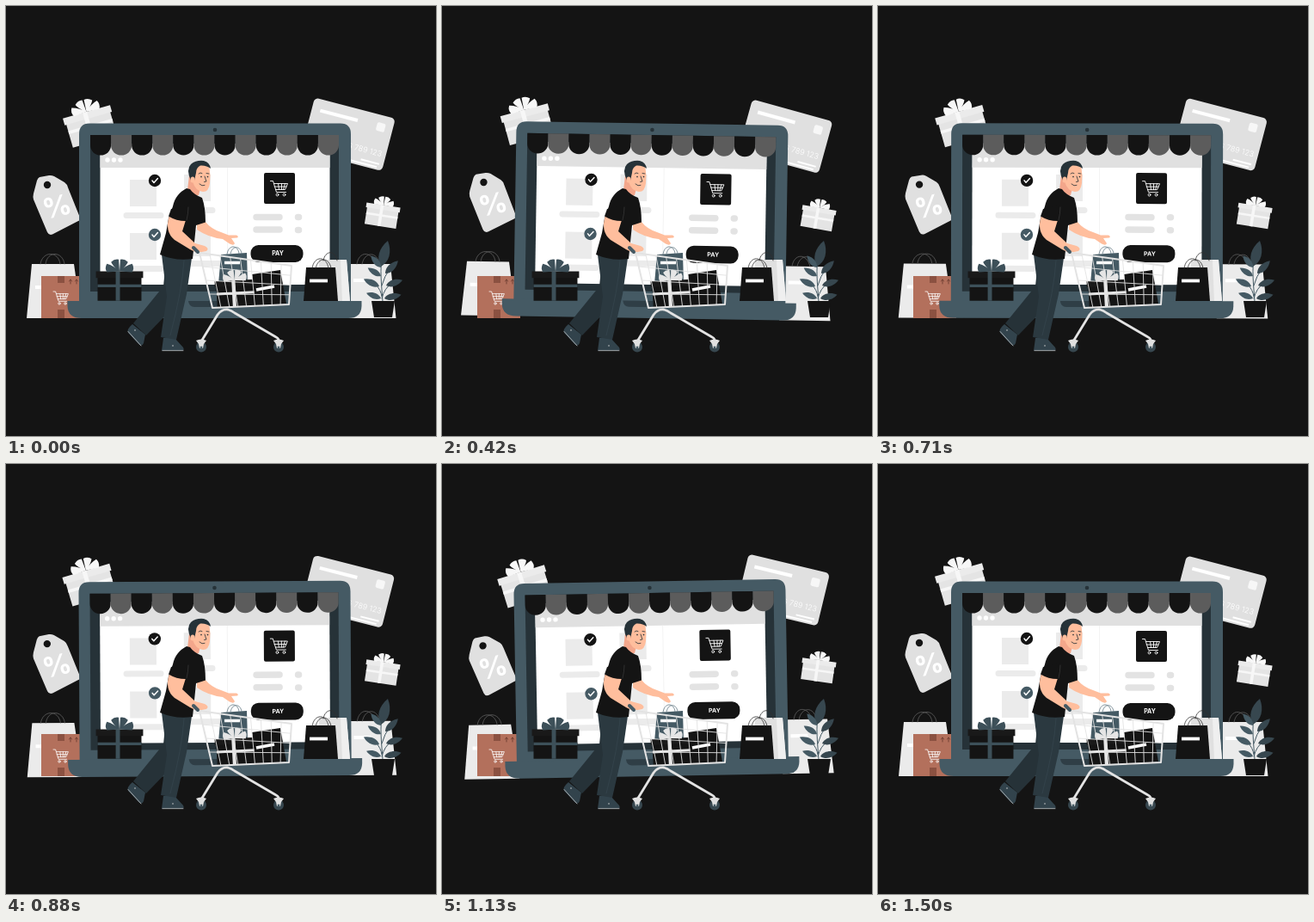
These frames come from a looping animation (500 by 500 pixels, 1540 ms). An HTML page:

```html
<!DOCTYPE html>
<html lang="en">
<head>
<meta charset="utf-8">
<title>Online shopping</title>
<style>
  html, body { margin: 0; height: 100%; overflow: hidden; background: #141414; }
  svg { display: block; width: 100vw; height: 100vh; }
  text { font-family: Inter, "Open Sans", sans-serif; fill: #fff; text-anchor: middle; }
  .line { fill: none; stroke-linecap: round; stroke-linejoin: round; }
  .box { fill: var(--box); }
  .lid { fill: var(--lid); }
  .ribbon { fill: var(--ribbon); }
  .light { --box: #e4e4e4; --lid: #ebebeb; --ribbon: #f7f7f7; }
  .dark { --box: #141414; --lid: #191919; --ribbon: #3d5059; }
  .mono { --box: #141414; --lid: #191919; --ribbon: #e6e6e6; }
</style>
</head>
<body>
<svg viewBox="0 0 500 500">
  <defs>
    <g id="bow">
      <path id="loops" d="M0 0L-15 1Q-18-4-15-9Q-7-7 0 0ZM0 0Q-8-6-10-11Q-6-15-1-14Z"/>
      <use href="#loops" transform="scale(-1 1)"/>
    </g>
    <g id="gift">
      <path class="box" d="M-26 6H26V35H-26Z"/>
      <path class="lid" d="M-28 0H28V8H-28Z"/>
      <path class="ribbon" d="M-4.500 0H.5V35H-4.500ZM-26 15.500H26V19H-26Z"/>
      <use class="ribbon" href="#bow"/>
    </g>
    <g id="cart" class="line" stroke="#fff" stroke-width=".9">
      <path d="M0 0H3L7 13H18M4 3H20L17 10H6M4.700 6.500H18.500M9 3L10 10M13 3V10M17 3L15 10"/>
      <circle cx="8" cy="16" r="1.400"/><circle cx="16" cy="16" r="1.400"/>
    </g>
    <path id="tick" class="line" d="M-3 0L-1 2.400 3.400-2.400" stroke="#fff" stroke-width="1.500"/>
    <path id="leaf" d="M0 0C5-5 5-13 0-20C-5-13-5-5 0 0Z"/>
  </defs>
  <rect width="500" height="500" fill="#141414"/>

  <g class="sway">
    <use href="#gift" class="light" transform="translate(93.5 123) rotate(-16) scale(1.02)"/>
    <use href="#gift" class="light" transform="translate(439 231.5) rotate(9) scale(.71)"/>

    <g transform="translate(359 106.5) rotate(14.6)">
      <rect width="97" height="63" rx="5" fill="#e0e0e0"/>
      <path d="M10 13H55" stroke="#fff" stroke-width="4"/>
      <rect x="78" y="9" width="10" height="10" rx="2" fill="#f7f7f7"/>
      <text x="92" y="47" font-size="9" font-weight="300" style="text-anchor: end">123 456 789 123</text>
      <path d="M70 56H92M56 60H90" stroke="#fff" stroke-width="2"/>
    </g>

    <path d="M39 199L50 197Q53 196.500 56 198L68 205Q71 207 72 211L86 246Q87 249 84 250L54 265.500Q50 267 48 263L32 225Q31 222 32 218L36 203Q37 200 39 199Z" fill="#e0e0e0"/>
    <circle cx="48" cy="208" r="4.200" fill="#141414"/>
    <text transform="translate(62 244.500) rotate(-14)" font-size="33" font-weight="700">%</text>

    <path d="M30 300H79L88 363H24Z" fill="#ebebeb"/>
    <path d="M400 300H447L453.500 363H394Z" fill="#ebebeb"/>
    <path d="M34 327H44M404 319H424" stroke="#fff" stroke-width="4"/>
    <path class="line" d="M40 300C42 285 61 284 63 300M46 300C48 284 66 285 68 300M408 300C410 285 425 284 429 300M414 300C417 285 432 285 434 300" stroke="#606060" stroke-width=".8"/>
  </g>

  <g>
    <path d="M41 314H91V363H41Z" fill="#b3705c"/>
    <path d="M60 314H68V322H60ZM60 353H68V363H60Z" fill="#8b5141"/>
    <path d="M75 323V318M73.500 320L75 318 76.500 320M82 323V318M80.500 320L82 318 83.500 320" class="line" stroke="#754235"/>
    <use href="#cart" transform="translate(55 332) scale(.87)"/>
  </g>

  <g class="sway">
    <path d="M97 136.500H389Q401 136.500 401 149V345H85V149Q85 136.500 97 136.500Z" fill="#455a64"/>
    <path d="M98 150H387V332H98Z" fill="#263238"/>
    <path d="M109.500 160H376.500V324H109.500Z" fill="#fff"/>
    <path d="M109.500 160H376.500V188H109.500Z" fill="#e0e0e0"/>
    <circle cx="243" cy="144" r="2.300" fill="#263238"/>
    <path d="M118 179h0M125.500 179h0M133 179h0" class="line" stroke="#fff" stroke-width="5.400"/>
    <g id="awning"></g>

    <path d="M257.500 188V324" stroke="#f3f3f3"/>
    <path d="M144 202H175V233H144ZM144 264H175V295H144ZM207 196H238V227H207ZM207 260H238V291H207Z" fill="#ebebeb"/>
    <path d="M140 243.500H180M140 305.500H180M203 237.500H240M206 299.500H249" class="line" stroke="#ebebeb" stroke-width="7"/>
    <circle cx="173" cy="203" r="7.200" fill="#141414"/>
    <use href="#tick" x="173" y="203"/>
    <circle cx="173" cy="266" r="7.200" fill="#455a64"/>
    <use href="#tick" x="173" y="266"/>
    <rect x="300" y="194" width="36" height="36" rx="2" fill="#141414"/>
    <use href="#cart" x="307.500" y="203.500"/>
    <path d="M291 245.500H318M291 260H318M339.500 245.500H340.500M339.500 260.500H340.500" class="line" stroke="#e3e3e3" stroke-width="7.500"/>
    <rect x="284.500" y="278" width="61" height="20" rx="9" fill="#141414"/>
    <text x="316" y="290.300" font-size="7" font-weight="700">PAY</text>

    <path d="M71.500 343H413.500V349Q413 363 398 363H88Q72 363 71.500 349Z" fill="#455a64"/>
    <path d="M212 343H275Q274 350 268 350H219Q213 350 212 343Z" fill="#2f3e46"/>
  </g>

  <use href="#gift" class="dark" transform="translate(132 308.5) scale(.98)"/>

  <g>
    <path d="M364 295H396L400 343H362Z" fill="#e0e0e0"/>
    <path d="M389 295H396L400 343H391Z" fill="#efefef"/>
    <path d="M349 304H383L386 343H346Z" fill="#141414"/>
    <path d="M353 319.500H374" stroke="#fff" stroke-width="3.800"/>
    <path class="line" d="M369 296C371 284 383 283 385 296M356 305C358 290 373 290 375 305M360 305C363 291 376 292 378 305" stroke="#303030" stroke-width=".8"/>
  </g>

  <g fill="#37474f">
    <path class="line" d="M438 344C437 325 434 309 438 283M437 325Q440 314 446 306M437 340Q440 328 448 323M437 338Q436 330 430 324" stroke="#455a64"/>
    <use href="#leaf" transform="translate(436 303) rotate(15) scale(1.6 1.55)"/>
    <use href="#leaf" transform="translate(441 311) rotate(45) scale(1.05)"/>
    <use href="#leaf" transform="translate(442 325) rotate(72)"/>
    <use href="#leaf" transform="translate(440 340) rotate(78)"/>
    <g fill="#455a64">
      <use href="#leaf" transform="translate(436 304) rotate(-40) scale(.9)"/>
      <use href="#leaf" transform="translate(436 314) rotate(-58) scale(.9)"/>
      <use href="#leaf" transform="translate(434 326) rotate(-65)"/>
      <use href="#leaf" transform="translate(436 340) rotate(-70) scale(.9)"/>
    </g>
    <path d="M425 343H452L449 362H428Z" fill="#141414"/>
  </g>

  <!-- Shopper -->
  <g>
    <path d="M222 254L232 251Q238 259 250 263L259 266.500 268 266.500Q271 268 269 269.500L262 270 266 276Q265 279 260 276.500L252 271Q235 269 222 260Z" fill="#ffbe9d"/>
    <path d="M147 370L162 382 160 392Q158 397 154 393L142 380Q140 376 147 370ZM183 386H196L206 397Q208 401 204 401H181Z" fill="#32434c"/>
    <path class="line" d="M142 378.500L157 395M182 400.700H206" stroke="#d8d8d8" stroke-width=".7"/>
    <path d="M150 377h0M194 395h0" class="line" stroke="#d8d8d8" stroke-width="1.500"/>
    <path d="M181 289L186 296 183 326 148 369 163 383 194 351 206 320Z" fill="#263238"/>
    <path d="M181 289L216 293 210 335 198 388 180 385 187 338Z" fill="#2b3940"/>
    <path d="M207 296Q205 330 191 383" class="line" stroke="#37474f" stroke-width=".7"/>
    <path d="M213 197L211 214Q216 223 224 220L226 212Z" fill="#f3a68b"/>
    <path d="M210 212C202 216 196 223 194 233L189 247 186 264 179 289Q197 297 217 294L221 255 232 251.500Q232 234 228 223Q218 219 214 213Z" fill="#141414"/>
    <path d="M190 244L209 249 205 262 220 276 231 279Q237 282 233 285L222 287 214 283 196 272Q184 262 190 244Z" fill="#ffbe9d"/>
    <path d="M192 236L189 244.500Q198 250 209 250L212 232Z" fill="#141414"/>
    <path d="M210 249Q212 241 212 234" class="line" stroke="#444" stroke-width=".6"/>

    <path d="M216 189C220 183 232 182 236.500 188Q238 196 237 206Q236 216 229 216Q220 215 217 204Z" fill="#ffbe9d"/>
    <path d="M215 203Q209 190 215 184Q221 179 230 180Q237 182 238 189Q233 185 226 185.500Q221 188 221 194L219 203Z" fill="#263238"/>
    <ellipse cx="217" cy="202" rx="2.500" ry="3.500" fill="#ffbe9d"/>
    <path d="M224 195Q226 193 228 194.500M233 194.500L236 195M231 198L233 204 230.500 204.500M225 207Q228 210 231 208.500" class="line" stroke="#263238" stroke-width=".8"/>
    <path d="M227 198.500h0M234.500 198.500h0" class="line" stroke="#263238" stroke-width="1.700"/>
  </g>

  <!-- Trolley -->
  <g>
    <path d="M250 289L280 287 281 323H247Z" fill="#455a64"/>
    <path d="M254 298.500H272" stroke="#fff" stroke-width="3.500"/>
    <path class="line" d="M257 289C258 277 270 277 271 288M261 289C262 278 273 278 274 288" stroke="#607580" stroke-width=".8"/>
    <path d="M286 312L319 307 326 346 289 350Z" fill="#141414"/>
    <path d="M291 330L312 326" stroke="#fff" stroke-width="3.800"/>
    <use href="#gift" class="mono" transform="translate(266 319) rotate(-3) scale(.84 .86)"/>
    <g class="line" stroke="#e3e3e3">
      <path id="mesh" stroke-width=".9"/>
      <path d="M219 282L225 287 332 302 329 347 240 351 225 287" stroke-width="2"/>
      <path d="M227 390L246 359Q251 352 258 353Q262 354 266 357L314 385Q318 387 317 391" stroke-width="2.800"/>
    </g>
    <path d="M218 281L223 286" class="line" stroke="#455a64" stroke-width="4"/>
    <g id="wheel">
      <circle cx="227" cy="396.500" r="6" fill="#37474f"/>
      <path d="M221 389Q227 386 233 389L230 393 229 398H225L224 393Z" fill="#e0e0e0"/>
      <circle cx="227" cy="397" r="1.500" fill="#455a64"/>
    </g>
    <use href="#wheel" x="90"/>
  </g>
</svg>
<script>
  const LOOP = 1540, SWING = 1500, STEP = 1000 / 24;
  const swaying = document.querySelectorAll('.sway');

  const stripe = 289 / 12;
  document.getElementById('awning').innerHTML = Array.from({ length: 12 }, (_, i) =>
    `<path d="M${98 + i * stripe} 150h${stripe}v12a${stripe / 2} 11.500 0 0 1-${stripe} 0z"
      fill="${i % 2 ? '#5c5c5c' : '#141414'}"/>`).join('');

  // Wires between opposite edges of the basket.
  const [a, b, c, d] = [[225, 287], [332, 302], [329, 347], [240, 351]];
  const mix = (p, q, k) => p.map((v, i) => v + (q[i] - v) * k);
  const wires = (p, q, r, s, n) => Array.from({ length: n - 1 }, (_, i) =>
    `M${mix(p, q, (i + 1) / n)}L${mix(r, s, (i + 1) / n)}`).join('');
  document.getElementById('mesh').setAttribute('d', wires(a, b, d, c, 9) + wires(a, d, b, c, 4));

  // Linear swing: 0 to 1 to -1 to 0 degrees, at 24 steps a second.
  function angle(ms) {
    const u = Math.floor((ms % LOOP + 5) / STEP) * STEP / SWING % 1;
    return u < .25 ? u * 4 : u < .75 ? 2 - u * 4 : u * 4 - 4;
  }

  function draw() {
    const turn = `rotate(${angle(performance.now())} 242 236)`;
    swaying.forEach(g => g.setAttribute('transform', turn));
    requestAnimationFrame(draw);
  }
  draw();
</script>
</body>
</html>
```
